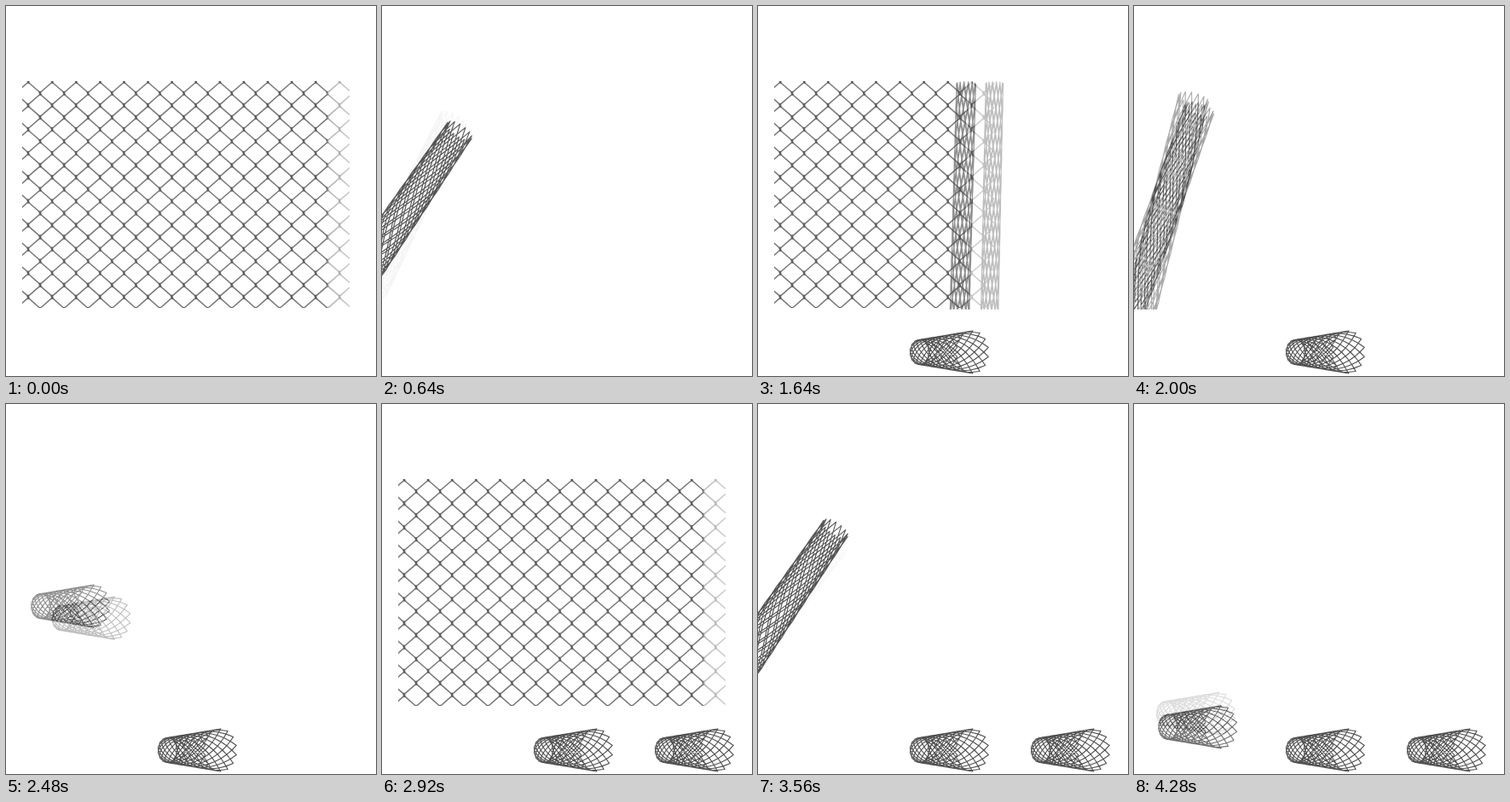
Animation, 434 px wide and 434 px high, one loop 4320 ms. Source, as an HTML page with a canvas:

```html
<!DOCTYPE html>
<html>
<head>
<meta charset="utf-8">
<style>
html, body { margin: 0; width: 100%; height: 100%; overflow: hidden; background: #fff; }
canvas { display: block; }
</style>
</head>
<body>
<canvas id="stage" width="434" height="434"></canvas>
<script>
const SIZE = 434, LOOP = 4320, TICK = 40, CYCLE = 36;
const PITCH = 28.1, LEFT = 19, RIGHT = 403, TOP = 88, BOTTOM = 354;
const ctx = document.getElementById('stage').getContext('2d');
const buffer = document.createElement('canvas');
buffer.width = buffer.height = SIZE;
const g = buffer.getContext('2d');

// Tube poses: step, open end x y, far end x y, both radii, roundness of the ends, depth.
const keys = [
  [1, 377, 90, 377, 354, 7, 7, 0.2, 1],
  [11, 45, 93, 26, 362, 18, 18, 0.25, 1],
  [13, 70, 108, 3, 372, 18, 19, 0.35, 1],
  [16, 91, 146, -22, 312, 17, 21, 0.4, 1.1],
  [24, 79, 223, 16, 223, 25, 14.5, 0.75, 1.5]
];
const small = keys[4].slice(1);
// Resting places in order of arrival: left, top, steps of flight.
const slots = [[178, 380, 13], [320, 380, 13], [33, 384, 12]];
const start = [5, 197];

const mix = (a, b, k) => a + (b - a) * k;

function shifted(x, y) {
  const [fx, fy, bx, by, ...rest] = small;
  const dx = x - start[0], dy = y - start[1];
  return [fx + dx, fy + dy, bx + dx, by + dy, ...rest];
}

function poseAt(step, slot) {
  if (step >= 24) {
    const k = (step - 24) / slot[2];
    return shifted(mix(start[0], slot[0], k), mix(start[1], slot[1], k));
  }
  const i = keys.findIndex(key => key[0] > step);
  const a = keys[i - 1], b = keys[i];
  let k = (step - a[0]) / (b[0] - a[0]);
  if (i === 4) k = 1 - (1 - k) ** 2;
  return a.slice(1).map((v, j) => mix(v, b[j + 1], k));
}

function tube([fx, fy, bx, by, rf, rb, round, depth]) {
  const around = 14, rows = 18;
  const length = Math.hypot(fx - bx, fy - by);
  const ux = (fx - bx) / length, uy = (fy - by) / length;
  const node = (i, j) => {
    const angle = i / around * 2 * Math.PI;
    const v = 1 - (1 - j / rows) ** depth;
    const r = mix(rf, rb, v);
    const across = r * Math.cos(angle), along = r * round * Math.sin(angle);
    return [mix(fx, bx, v) - uy * across + ux * along,
            mix(fy, by, v) + ux * across + uy * along];
  };
  g.beginPath();
  for (let j = 0; j < rows; j++) {
    for (let i = 0; i < around; i++) {
      const at = i + (j % 2) / 2;
      g.moveTo(...node(at - 0.5, j + 1));
      g.lineTo(...node(at, j));
      g.lineTo(...node(at + 0.5, j + 1));
    }
  }
  g.strokeStyle = '#505050';
  g.lineWidth = 1.1;
  g.stroke();
}

function fence(edge) {
  g.save();
  g.beginPath();
  g.rect(LEFT, TOP, edge - LEFT, BOTTOM - TOP);
  g.clip();
  const half = PITCH / 2;
  const wires = new Path2D(), knots = new Path2D();
  for (let row = -1; row < 20; row++) {
    for (let col = -1; col < 28; col++) {
      if ((row + col) % 2) continue;
      const x = 26 + col * half, y = 88.5 + row * half;
      for (const side of [-1, 1]) {
        wires.moveTo(x + side * 0.7, y + 1.5);
        wires.lineTo(x + side * (half - 0.7), y + half - 1.5);
      }
      knots.moveTo(x - 0.6, y - 2.5);
      knots.lineTo(x + 0.6, y + 2.5);
    }
  }
  g.strokeStyle = '#777';
  g.lineWidth = 1.5;
  g.stroke(wires);
  g.strokeStyle = '#606060';
  g.lineWidth = 2.6;
  g.stroke(knots);
  g.restore();
}

function fadeRightEdge() {
  const shade = g.createLinearGradient(377, 0, RIGHT, 0);
  shade.addColorStop(0, 'rgba(255,255,255,0.3)');
  shade.addColorStop(1, 'rgba(255,255,255,0.55)');
  g.fillStyle = shade;
  g.fillRect(377, TOP, RIGHT - 377, BOTTOM - TOP);
}

function scene(index) {
  const turn = Math.floor(index / CYCLE), step = index % CYCLE;
  g.fillStyle = '#fff';
  g.fillRect(0, 0, SIZE, SIZE);
  g.lineJoin = 'round';
  for (const [x, y] of slots.slice(0, turn)) tube(shifted(x, y));
  if (step === 0) {
    fence(RIGHT);
    fadeRightEdge();
    return;
  }
  const pose = poseAt(step, slots[turn]);
  if (step < 12) fence(pose[0]);
  if (step === 1) return;
  g.save();
  if (step < 16) {
    g.beginPath();
    g.rect(0, TOP, SIZE, 356 - TOP);
    g.clip();
  }
  tube(pose);
  g.restore();
}

// Each tick blends two neighbouring steps of a slightly slower motion.
function draw(time) {
  const tick = Math.floor(time % LOOP / TICK);
  const phase = tick * 0.9875 + 0.14;
  const index = Math.floor(phase);
  ctx.globalAlpha = 1;
  scene(index);
  ctx.drawImage(buffer, 0, 0);
  ctx.globalAlpha = phase - index;
  scene(index + 1);
  ctx.drawImage(buffer, 0, 0);
}

const begin = performance.now();
function loop() {
  draw(performance.now() - begin);
  requestAnimationFrame(loop);
}
loop();
</script>
</body>
</html>
```
